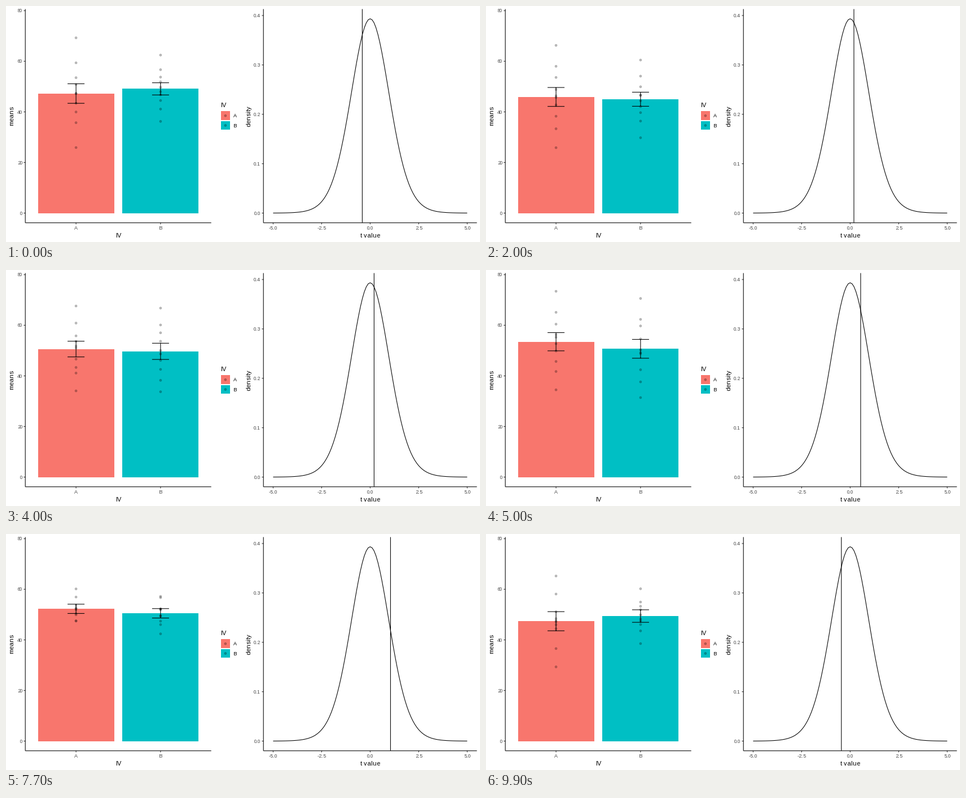
A matplotlib script for the animation above (10000 ms loop, 840x420 px).

```python
import math

import numpy as np
import matplotlib.pyplot as plt
from matplotlib.animation import FuncAnimation
from matplotlib.patches import Rectangle

W, H, DPI = 840, 420, 72
FRAMES, INTERVAL, HOLD = 100, 100, 10
RED, TEAL = "#F8766D", "#00BFC4"
TOP, BOTTOM, ZERO = 5.5, 385.8, 368.55
LEFT1, RIGHT1 = 34.2, 363.7
LEFT2, RIGHT2 = 456.2, 834.5
CENTERS = (124.1, 273.9)
BAR_LEFTS, BAR_WIDTH = (57, 206), 135
LINE = 1.07
N, DF = 10, 18

plt.rcParams["font.family"] = "Liberation Sans"
plt.rcParams["text.hinting_factor"] = 1  # whole-pixel letter spacing
rng = np.random.default_rng(12)


# ---- scales: data to pixels, y pointing down ----
def y_mean(v):
    return ZERO - 4.503 * np.asarray(v)


def y_density(d):
    return ZERO - 879 * np.asarray(d)


def x_t(t):
    return 645.35 + 34.39 * np.asarray(t)


def t_density(t):
    c = math.gamma((DF + 1) / 2) / (math.sqrt(DF * math.pi) * math.gamma(DF / 2))
    return c * (1 + t * t / DF) ** (-(DF + 1) / 2)


# ---- experiments: mean and standard error of groups A and B ----
RESULTS = [
    (47.25, 3.86, 49.1, 2.41),
    (47.5, 3.1, 51.8, 3.0),
    (45.9, 3.74, 45.0, 2.78),
    (45.6, 3.2, 58.1, 2.58),
    (50.6, 3.1, 49.7, 3.2),
    (53.5, 3.6, 50.7, 3.72),
    (48.05, 2.23, 58.8, 2.59),
    (50.55, 2.3, 51.8, 2.35),
    (54.0, 1.37, 49.2, 1.37),
    (48.0, 3.4, 51.0, 2.8),
]


def sample(mean, error):
    """Bell-shaped scores in random order with the given mean and error."""
    p = (np.arange(N) + 0.5) / N
    z = np.log(p / (1 - p)) + rng.normal(0, 0.15, N)
    z = (z - z.mean()) / z.std(ddof=1)
    return mean + error * math.sqrt(N) * rng.permutation(z)


means = [np.array(r[::2]) for r in RESULTS]
errors = [np.array(r[1::2]) for r in RESULTS]
scores = [np.concatenate([sample(*r[:2]), sample(*r[2:])]) for r in RESULTS]
t_values = [(m[0] - m[1]) / math.hypot(*e) for m, e in zip(means, errors)]


# ---- stage ----
fig = plt.figure(figsize=(W / DPI, H / DPI), dpi=DPI, facecolor="white")
ax = fig.add_axes([0, 0, 1, 1])
ax.set_xlim(0, W)
ax.set_ylim(H, 0)
ax.axis("off")


def line(xs, ys, color="black", z=3):
    return ax.plot(xs, ys, color=color, lw=LINE, snap=False, zorder=z,
                   solid_capstyle="butt", solid_joinstyle="round")[0]


def box(x, y, w, h, color):
    return ax.add_patch(Rectangle((x, y), w, h, facecolor=color, lw=0, zorder=1))


def dots(xs, ys):
    return ax.scatter(xs, ys, s=np.full(len(xs), 15.2), c="black", alpha=0.25,
                      linewidths=0.71, edgecolors="black", zorder=4)


def label(x, y, text, size=8.8, color="black", ha="center", **kw):
    ax.text(x, y, text, size=size, color=color, ha=ha, va="baseline", **kw)


def x_tick(x, text):
    line([x, x], [BOTTOM, BOTTOM + 2.75], "#333333", 2)
    label(x, 398, text, color="#4D4D4D")


def y_tick(left, y, text):
    line([left - 2.75, left], [y, y], "#333333", 2)
    label(left - 4.95, y + 3.1, text, color="#4D4D4D", ha="right")


def frame_panel(left, right, x_title, y_title, title_x):
    line([left, left], [TOP, BOTTOM])
    line([left, right], [BOTTOM, BOTTOM])
    label((left + right) / 2, 412, x_title, 11)
    label(title_x, (TOP + BOTTOM) / 2, y_title, 11,
          rotation=90, rotation_mode="anchor")


frame_panel(LEFT1, RIGHT1, "IV", "means", 13.5)
for v in range(0, 81, 20):
    y_tick(LEFT1, y_mean(v), str(v))
for x, name in zip(CENTERS, "AB"):
    x_tick(x, name)

frame_panel(LEFT2, RIGHT2, "t value", "density", 433.5)
for i in range(5):
    y_tick(LEFT2, y_density(i / 10), f"{i / 10:.1f}")
    t = -5 + 2.5 * i
    x_tick(x_t(t), f"{t:.1f}")
ts = np.linspace(-5, 5, 101)
line(x_t(ts), y_density(t_density(ts)))

# legend
label(380, 180, "IV", 11, ha="left")
for y, h, name, color in ((187, 16, "A", RED), (205, 15, "B", TEAL)):
    box(381, y, 16, h, color)
    label(402.7, y + 11.5, name, ha="left")
dots([388.85, 388.85], [195.25, 212.5])

# moving parts
bars = [box(x, 0, BAR_WIDTH, 0, c) for x, c in zip(BAR_LEFTS, (RED, TEAL))]
whiskers = [line([], []) for _ in CENTERS]
dot_xs = np.repeat(CENTERS, N)
points = dots(dot_xs, np.zeros(2 * N))
t_line = line([0, 0], [TOP, BOTTOM])


def update(frame):
    k, step = divmod(frame, HOLD)
    nxt = (k + 1) % len(RESULTS)
    rest = 3 if k == 0 else 4
    p = max(0, step - rest) / (HOLD - rest)

    def tween(values):
        return (1 - p) * values[k] + p * values[nxt]

    mean, error = tween(means), tween(errors)
    base = round(ZERO)
    for i, x in enumerate(CENTERS):
        top = round(float(y_mean(mean[i])))
        bars[i].set_y(top)
        bars[i].set_height(base - top)
        hi, lo = y_mean(mean[i] + error[i]), y_mean(mean[i] - error[i])
        a, b, gap = x - 15, x + 15, np.nan
        whiskers[i].set_data([a, b, gap, x, x, gap, a, b],
                             [hi, hi, gap, hi, lo, gap, lo, lo])
    points.set_offsets(np.column_stack([dot_xs, y_mean(tween(scores))]))
    x = float(x_t(tween(t_values)))
    t_line.set_xdata([x, x])
    return [*bars, *whiskers, points, t_line]


anim = FuncAnimation(fig, update, frames=FRAMES, interval=INTERVAL,
                     init_func=lambda: update(0), repeat=True, blit=False)
plt.show()
```
